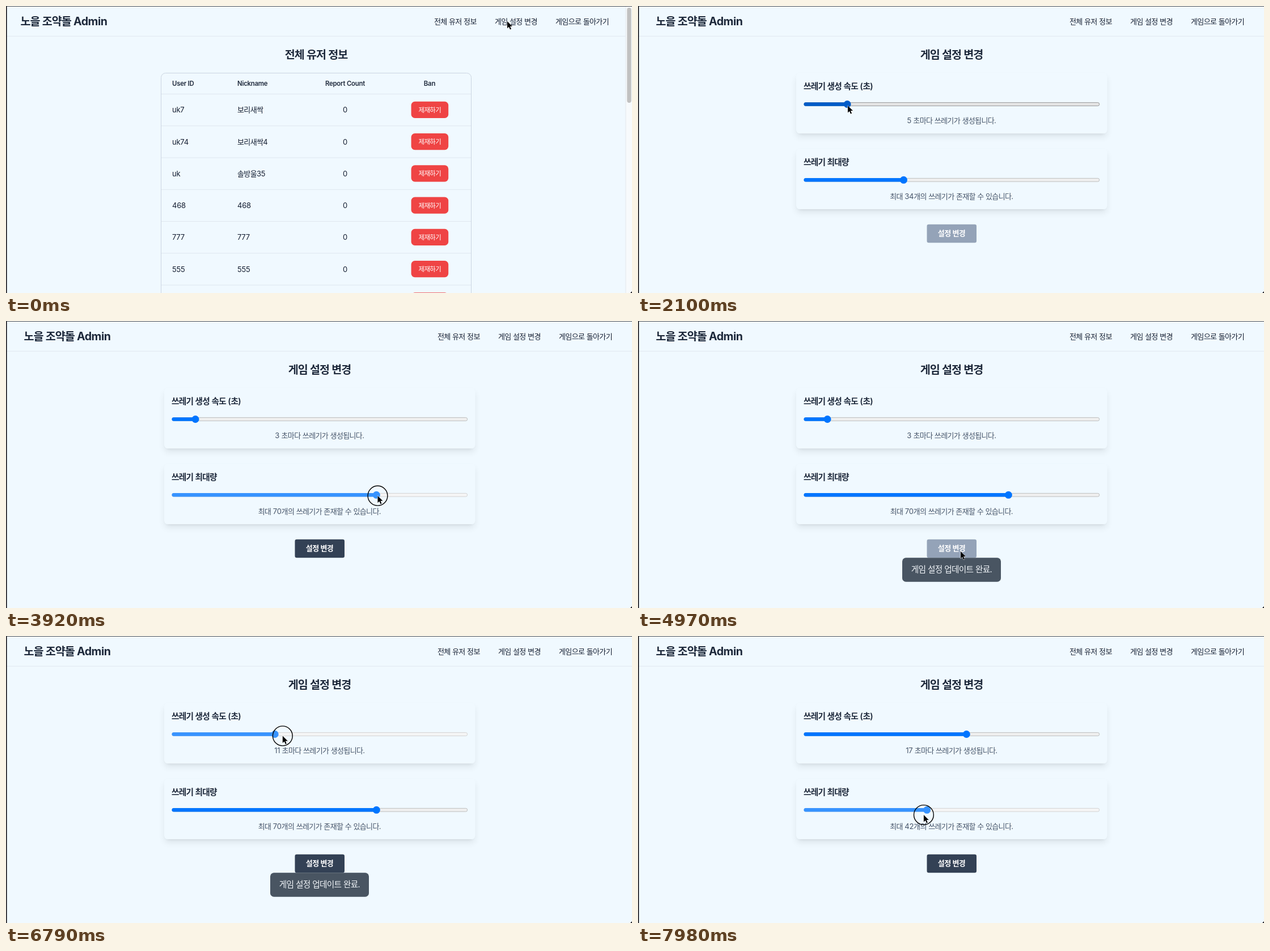
Write an HTML page that moves like this. It is 1104 px wide and 507 px high and loops after 8 s.

```html
<!DOCTYPE html>
<html lang="ko">
<head>
<meta charset="utf-8">
<style>
html, body { margin: 0; width: 100%; height: 100%; overflow: hidden; background: #f0f9ff; }
svg { display: block; width: 1104px; height: 507px; }
text { font-family: Inter, "Noto Sans CJK KR", "Noto Sans CJK", sans-serif; letter-spacing: -.022em; white-space: pre; }
.k { letter-spacing: -.052em; }
</style>
</head>
<body>
<svg id="stage" viewBox="0 0 1104 507" xmlns="http://www.w3.org/2000/svg"></svg>
<script>
const LOOP = 8000, STEP = 70;
const BG = '#f0f9ff', INK = '#1e293b', MUTED = '#94a3b8', SLATE = '#334155';

// Type sizes: the page is shown at a reduced zoom.
const ZOOM = .816;
const SMALL = 14 * ZOOM, BODY = 16 * ZOOM, LARGE = 18 * ZOOM, TITLE = 24 * ZOOM;

// Hangul is set tighter than Latin.
const hangul = s => s.replace(/[가-힣]+/g, '<tspan class="k">$&</tspan>');
const text = (s, x, y, size, o = {}) =>
  `<text x="${x}" y="${y}" font-size="${size}" font-weight="${o.w || 400}" fill="${o.fill || '#172033'}"
    text-anchor="${o.mid ? 'middle' : 'start'}" ${o.name ? `id="${o.name}"` : ''}>${hangul(s)}</text>`;
const rect = (x, y, w, h, r, attrs) =>
  `<rect x="${x}" y="${y}" width="${w}" height="${h}" rx="${r}" ${attrs}/>`;
const heading = (s, x) => text(s, x, 92.5, TITLE, { w: 700, fill: INK, mid: 1 });

function header() {
  return rect(0, 52.8, 1104, 1, 0, 'fill="#e2e8f0"') + '<g id="head">' +
    text('노을 조약돌 Admin', 25.5, 33.5, TITLE, { w: 700, fill: INK }) +
    text('전체 유저 정보', 755, 31.5, BODY) +
    text('게임 설정 변경', 862, 31.5, BODY, { name: 'link' }) +
    text('게임으로 돌아가기', 969, 31.5, BODY) + '</g>';
}

function usersPage() {
  const users = ['uk7 보리새싹', 'uk74 보리새싹4', 'uk 솔방울35', '468 468', '777 777', '555 555', ' '];
  const th = { w: 600, fill: INK }, thMid = { ...th, mid: 1 };
  const rows = users.map((user, i) => {
    const y = 155 + i * 56.25, [uid, nick] = user.split(' ');
    return rect(274, y, 546, 1, 0, 'fill="#dfe7ef"') +
      text(uid, 293, y + 33.3, BODY) + text(nick, 408, y + 33.3, BODY) +
      text('0', 598, y + 33.3, BODY, { mid: 1 }) +
      rect(714.6, y + 13.8, 65.6, 29.2, 6.5, 'fill="#ef4444"') +
      text('제재하기', 747.3, y + 32.8, SMALL, { mid: 1, fill: '#fff' });
  });
  return heading('전체 유저 정보', 547) +
    rect(273.5, 118.5, 547, 420, 8, 'fill="none" stroke="#cbd5e1"') +
    text('User ID', 293, 141, SMALL, th) + text('Nickname', 408, 141, SMALL, th) +
    text('Report Count', 598, 141, SMALL, thMid) + text('Ban', 747, 141, SMALL, thMid) +
    rows.join('') +
    rect(1093, 0, 11, 507, 0, 'fill="#f7fafc"') +
    rect(1092.5, 0, 1, 507, 0, 'fill="#e3e8ec"') +
    rect(1095.3, 3, 7.4, 168, 3.7, 'fill="#c1c1c1"');
}

function card(n, y, title) {
  return rect(279, y + 6.5, 548.5, 106.5, 6.5, 'fill="#000" opacity=".07" filter="url(#soft)"') +
    rect(282.3, y + 6.6, 541.4, 100, 5, 'fill="#000" opacity=".1" filter="url(#tight)"') +
    rect(279, y, 548.5, 106.5, 6.5, `fill="${BG}"`) +
    text(title, 292, y + 28.3, LARGE, { w: 600, fill: INK }) +
    rect(292.9, y + 51.8, 520.8, 5.8, 2.9, `id="track${n}" stroke-width=".8"`) +
    rect(292.5, y + 51.5, 0, 6.4, 3.2, `id="fill${n}"`) +
    `<circle id="thumb${n}" cy="${y + 54.7}" r="6.5"/>` +
    text('', 553, y + 88.5, BODY, { mid: 1, fill: '#475569', name: 'note' + n });
}

function settingsPage() {
  return heading('게임 설정 변경', 553) +
    card('A', 118.8, '쓰레기 생성 속도 (초)') + card('B', 252.6, '쓰레기 최대량') +
    rect(509.5, 385.7, 87.5, 32.5, 3.3, 'id="save"') +
    text('설정 변경', 553, 406.2, BODY, { w: 600, fill: '#fff', mid: 1 }) +
    '<g id="toast">' + rect(466, 418.3, 174, 42.4, 6.5, 'fill="#495562"') +
    text('게임 설정 업데이트 완료.', 553, 444.3, LARGE, { fill: '#f1f5f9', mid: 1 }) + '</g>';
}

const $ = name => document.getElementById(name);
$('stage').innerHTML = `
  <defs>
    <filter id="soft" x="-10%" y="-40%" width="120%" height="180%"><feGaussianBlur stdDeviation="6.1"/></filter>
    <filter id="tight" x="-10%" y="-40%" width="120%" height="180%"><feGaussianBlur stdDeviation="2.5"/></filter>
  </defs>
  ${rect(0, 0, 1104, 507, 0, `fill="${BG}"`)}
  ${header()}
  <g id="users">${usersPage()}</g>
  <g id="settings">${settingsPage()}</g>
  <g id="status">
    ${rect(-6, 495.2, 173.5, 20, 3.5, 'fill="#000" opacity=".3" filter="url(#tight)"')}
    ${rect(-6, 495.5, 173.5, 20, 3.5, 'fill="#5c6064"')}
    ${text('localhost:5173/admin/edit-setting', 6, 508.5, 10, { fill: '#e8eaed' })}
  </g>
  ${rect(0, 0, 1.6, 507, 0, 'fill="#17151a"')}
  ${rect(0, 0, 1104, .9, 0, 'fill="#3b3f45"')}
  <path d="M1104 504V507H1101Z" fill="#17151a"/>
  <g id="cursor">
    <circle id="ring" r="17.4" fill="none" stroke="#000" stroke-width="1.4"/>
    <path id="arrow" d="M0 0V12.5L2.9 9.8 5 14.6 7 13.8 5 9.1H9Z" fill="#000" stroke="#fff" paint-order="stroke"/>
    <path id="hand" d="M-.4 .2Q.9-.6 1.6 .9L2.5 4.6Q3.8 3.8 4.6 4.7 5.8 4.1 6.5 5.2 8 4.8 8.4 6.5V9.5L7.4 13H1L-2.9 8.3Q-3.3 6.6-1.4 7.1L-.1 8.2-1.3 1.8Q-1.4 .6-.4 .2ZM2.6 8.8V11M4.4 8.8V11M6.2 8.8V11"
      fill="#fff" stroke="#17151a" stroke-width=".95" stroke-linejoin="round"/>
  </g>`;

const OPENED = 910, SAVED = 4900, LAG = 30;
const HOME = { x: 884, y: 27 };
const move = (from, to, x, y) => ({ from, to, x, y });
const MOVES = [
  move(70, 490, 869, 34),      // to the link
  move(1330, 2100, 370, 176),  // to the speed slider
  move(2310, 2660, 336, 178),
  move(2870, 3570, 468, 316),  // to the amount slider
  move(3640, 3880, 655.5, 308.7),
  move(4270, 4760, 569, 407),  // to the button
  move(5250, 6020, 335, 169),
  move(6300, 7140, 580, 181),
  move(7140, 7560, 653, 313),
  move(7560, 8000, 503, 316)
];
const CLICKS = [[700, OPENED], [4760, SAVED]];
const SPEED = { id: 'A', y: 173.6, unit: 17.52, value: 5, drags: [[2310, 2870], [6300, 7140]],
  note: v => `${v} 초마다 쓰레기가 생성됩니다.` };
const AMOUNT = { id: 'B', y: 307.4, unit: 5.135, value: 34, drags: [[3640, 4270], [7560, LOOP]],
  note: v => `최대 ${v}개의 쓰레기가 존재할 수 있습니다.` };
const SLIDERS = [SPEED, AMOUNT];

const within = (t, [a, b]) => t >= a && t < b;
const ramp = (t, from, span) => Math.min(1, Math.max(0, (t - from) / span));
const ease = u => u * u * (3 - 2 * u);
const mix = (a, b, u) => a + (b - a) * u;

function cursorAt(t) {
  return MOVES.reduce((p, m) => {
    const u = ease(ramp(t, m.from, m.to - m.from));
    return { x: mix(p.x, m.x, u), y: mix(p.y, m.y, u) };
  }, HOME);
}

// A slider follows the cursor slightly late and keeps its value on release.
function valueAt(slider, t) {
  const drag = slider.drags.filter(d => d[0] <= t).pop();
  if (!drag) return slider.value;
  const { x } = cursorAt(Math.min(t, drag[1]) - LAG);
  return Math.round((x - 299) / slider.unit + 1);
}

// Fill, track and border for each control state
const LOOK = {
  idle: ['#0075ff', '#efefef', '#b2b2b2'],
  hover: ['#005cc8', '#e5e5e5', '#858585'],
  drag: ['#3793ff', '#f5f5f5', '#cbcbcb']
};

const set = (name, attrs) => {
  for (const key in attrs) $(name).setAttribute(key, attrs[key]);
};
const show = (name, on) => set(name, { visibility: on ? 'inherit' : 'hidden' });

function drawSlider(slider, t, { x, y }) {
  const { id, unit, drags, note } = slider;
  const value = valueAt(slider, t), thumb = 299 + (value - 1) * unit;
  const hit = x > 292 && x < 814 && Math.abs(y - slider.y) < 7;
  const state = drags.some(d => within(t, d)) ? 'drag' : hit ? 'hover' : 'idle';
  const [fill, track, stroke] = LOOK[state];
  set('track' + id, { fill: track, stroke });
  set('fill' + id, { fill, width: thumb - 292.5 });
  set('thumb' + id, { fill, cx: thumb });
  $('note' + id).innerHTML = hangul(note(value));
}

function draw(time) {
  const t = Math.floor(time / STEP) * STEP;
  const cursor = cursorAt(t), onUsers = t < OPENED;

  show('users', onUsers);
  show('settings', !onUsers);
  set('head', { transform: `translate(${onUsers ? 0 : 6})` });

  const overLink = within(t, [140, 1470]);
  const glow = ramp(t, 70, 210) - ramp(t, 1400, 210);
  const rgb = [23, 32, 51].map((c, i) => Math.round(mix(c, [148, 163, 184][i], glow)));
  set('link', { fill: `rgb(${rgb})` });
  set('status', { opacity: ramp(t, 140, 210) - ramp(t, 1470, 280) });

  SLIDERS.forEach(s => drawSlider(s, t, cursor));
  const since = t < SAVED ? 0 : SAVED;
  const dirty = SLIDERS.some(s => valueAt(s, t) !== valueAt(s, since));
  set('save', { fill: dirty ? SLATE : MUTED });
  show('toast', within(t, [SAVED, SAVED + 2500]));

  set('cursor', { transform: `translate(${cursor.x} ${cursor.y})` });
  show('ring', [...CLICKS, ...SPEED.drags, ...AMOUNT.drags].some(p => within(t, p)));
  show('hand', overLink);
  show('arrow', !overLink);
}

const start = performance.now();
function tick() {
  draw((performance.now() - start) % LOOP);
  requestAnimationFrame(tick);
}
tick();
</script>
</body>
</html>
```
